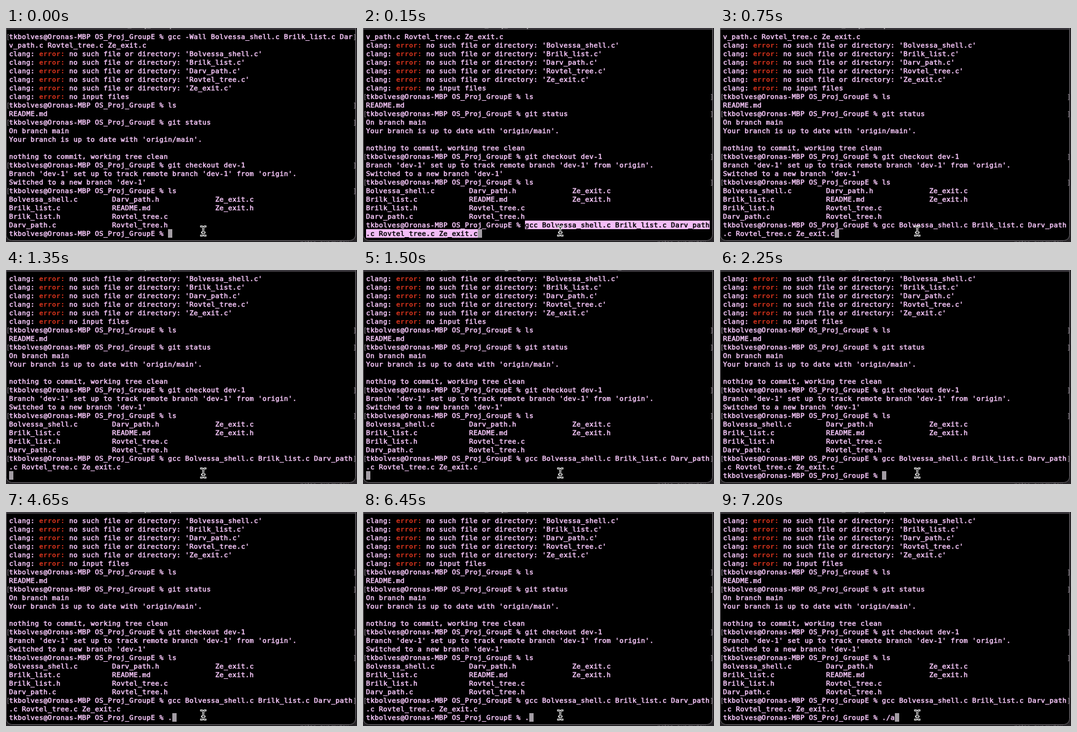
An HTML page with a canvas that plays this animation: 572 px wide and 350 px high, repeating every 8000 ms.

```html
<!DOCTYPE html>
<html lang="en">
<head>
<meta charset="utf-8">
<title>Terminal</title>
<style>
  html, body { margin: 0; width: 572px; height: 350px; overflow: hidden; background: #262427; }
  canvas { display: block; }
</style>
</head>
<body>
<canvas id="stage" width="572" height="350"></canvas>
<script>
const ctx = document.getElementById('stage').getContext('2d');
const LOOP = 8000, ROWS = 24, COLS = 80, CELL = 7, LINE = 14, LEFT = 5, TOP = 7;
const PINK = '#f8c8fb', RED = '#d8331c', GRAY = '#a39da4', MARK = '#89808b';
const MONO = '11px "DejaVu Sans Mono", monospace';

const prompt = 'tkbolves@Oronas-MBP OS_Proj_GroupE % ';
const files = ['Bolvessa_shell.c', 'Brilk_list.c', 'Darv_path.c', 'Rovtel_tree.c', 'Ze_exit.c'];
const command = 'gcc ' + files.join(' ');
const columns = (...names) => names.map(n => n.padEnd(24)).join('').trimEnd();
const wrap = s => s.match(new RegExp(`.{1,${COLS}}`, 'g'));

const history = [
  ...wrap(prompt + 'gcc -Wall ' + files.join(' ')),
  ...files.map(f => `clang: error: no such file or directory: '${f}'`),
  'clang: error: no input files',
  prompt + 'ls',
  'README.md',
  prompt + 'git status',
  'On branch main',
  "Your branch is up to date with 'origin/main'.",
  '',
  'nothing to commit, working tree clean',
  prompt + 'git checkout dev-1',
  "Branch 'dev-1' set up to track remote branch 'dev-1' from 'origin'.",
  "Switched to a new branch 'dev-1'",
  prompt + 'ls',
  columns('Bolvessa_shell.c', 'Darv_path.h', 'Ze_exit.c'),
  columns('Brilk_list.c', 'README.md', 'Ze_exit.h'),
  columns('Brilk_list.h', 'Rovtel_tree.c'),
  columns('Darv_path.c', 'Rovtel_tree.h')
];

// Start time and value of each step
const typed = [[0, ''], [4650, '.'], [4950, './'], [6450, '.'], [6900, './'], [7200, './a']];
const titles = [
  [0, 'OS_Proj_GroupE — -zsh — 80×24'],
  [1500, 'OS_Proj_GroupE — clang ◂ gcc Bolvessa_shell.c Brilk_li — 80×24'],
  [2100, 'OS_Proj_GroupE — ld ◂ gcc Bolvessa_shell.c Brilk_list — 80×24'],
  [2250, 'OS_Proj_GroupE — -zsh — 80×24']
];
const valueAt = (steps, t) => steps.filter(s => s[0] <= t).pop()[1];

function screenAt(t) {
  if (t < 150) return [...history, prompt];
  const lines = [...history, ...wrap(prompt + command)];
  if (t >= 1350) lines.push(t < 2100 ? '' : prompt + valueAt(typed, t));
  return lines;
}

function box(x, y, w, h, color) {
  ctx.fillStyle = color;
  ctx.fillRect(x, y, w, h);
}

// The thin outline gives the text its medium weight.
function write(text, row, color, from = 0, outline = .5) {
  ctx.fillStyle = ctx.strokeStyle = color;
  ctx.lineWidth = outline;
  [...text].forEach((c, i) => {
    const x = LEFT + (from + i) * CELL, y = TOP + row * LINE + 11;
    ctx.fillText(c, x, y);
    if (outline) ctx.strokeText(c, x, y);
  });
}

function drawWindow(t) {
  box(0, 0, 572, 350, '#262427');
  ctx.font = '10px Inter, sans-serif';
  ctx.fillStyle = '#69656a';
  ctx.fillText('- notes, our mutex', 472, 355);

  ctx.beginPath();
  ctx.roundRect(.5, -12, 569, 359.5, 9);
  ctx.fillStyle = '#000';
  ctx.fill();
  ctx.strokeStyle = '#6a666b';
  ctx.lineWidth = 1;
  ctx.stroke();

  box(1, 0, 568, 3, '#38353a');
  ctx.save();
  ctx.beginPath();
  ctx.rect(0, 0, 572, 2);
  ctx.clip();
  ctx.font = 'bold 13px Inter, sans-serif';
  ctx.textAlign = 'center';
  ctx.fillStyle = '#aaa5ab';
  ctx.fillText(valueAt(titles, t), 286, -1);
  ctx.restore();
}

function drawText(t) {
  const lines = screenAt(t), skip = lines.length - ROWS;
  const active = t < 150 || t >= 2100 ? lines.length - 1 : t < 1350 ? lines.length - 2 : -1;
  const selected = t >= 150 && t < 750;

  box(LEFT + lines.at(-1).length * CELL, TOP + (ROWS - 1) * LINE, CELL, LINE, GRAY);
  ctx.font = MONO;
  lines.slice(skip).forEach((line, row) => {
    const isPrompt = line.startsWith(prompt);
    if (isPrompt && row + skip !== active) {
      const y = TOP + row * LINE + 11;
      ctx.fillStyle = MARK;
      ctx.fillText('[', 0, y);
      ctx.fillText(']', 565, y);
    }
    write(line.replace('error:', '      '), row, PINK);
    if (line.includes('error:')) {
      ctx.font = 'bold ' + MONO;
      write('error:', row, RED, 7, 0);
      ctx.font = MONO;
    }
    if (selected && row >= ROWS - 2) {
      const from = isPrompt ? prompt.length : 0;
      box(LEFT + from * CELL, TOP + row * LINE, (line.length - from) * CELL, LINE, '#f3bdf7');
      write(line.slice(from), row, '#000', from);
    }
  });
}

function drawPointer() {
  ctx.save();
  ctx.translate(-.5, -1);
  ctx.beginPath();
  ctx.moveTo(318.5, 325.5);
  ctx.quadraticCurveTo(322, 325.5, 322, 328.5);
  ctx.quadraticCurveTo(322, 325.5, 325.5, 325.5);
  ctx.moveTo(322, 328);
  ctx.lineTo(322, 338);
  ctx.moveTo(318.5, 340.5);
  ctx.quadraticCurveTo(322, 340.5, 322, 337.5);
  ctx.quadraticCurveTo(322, 340.5, 325.5, 340.5);
  ctx.moveTo(320, 335.5);
  ctx.lineTo(324, 335.5);
  ctx.lineCap = 'square';
  for (const [width, color] of [[3, '#fff'], [1, '#000']]) {
    ctx.lineWidth = width;
    ctx.strokeStyle = color;
    ctx.stroke();
  }
  ctx.restore();
}

function draw() {
  const t = performance.now() % LOOP;
  drawWindow(t);
  drawText(t);
  drawPointer();
  requestAnimationFrame(draw);
}
draw();
</script>
</body>
</html>
```
